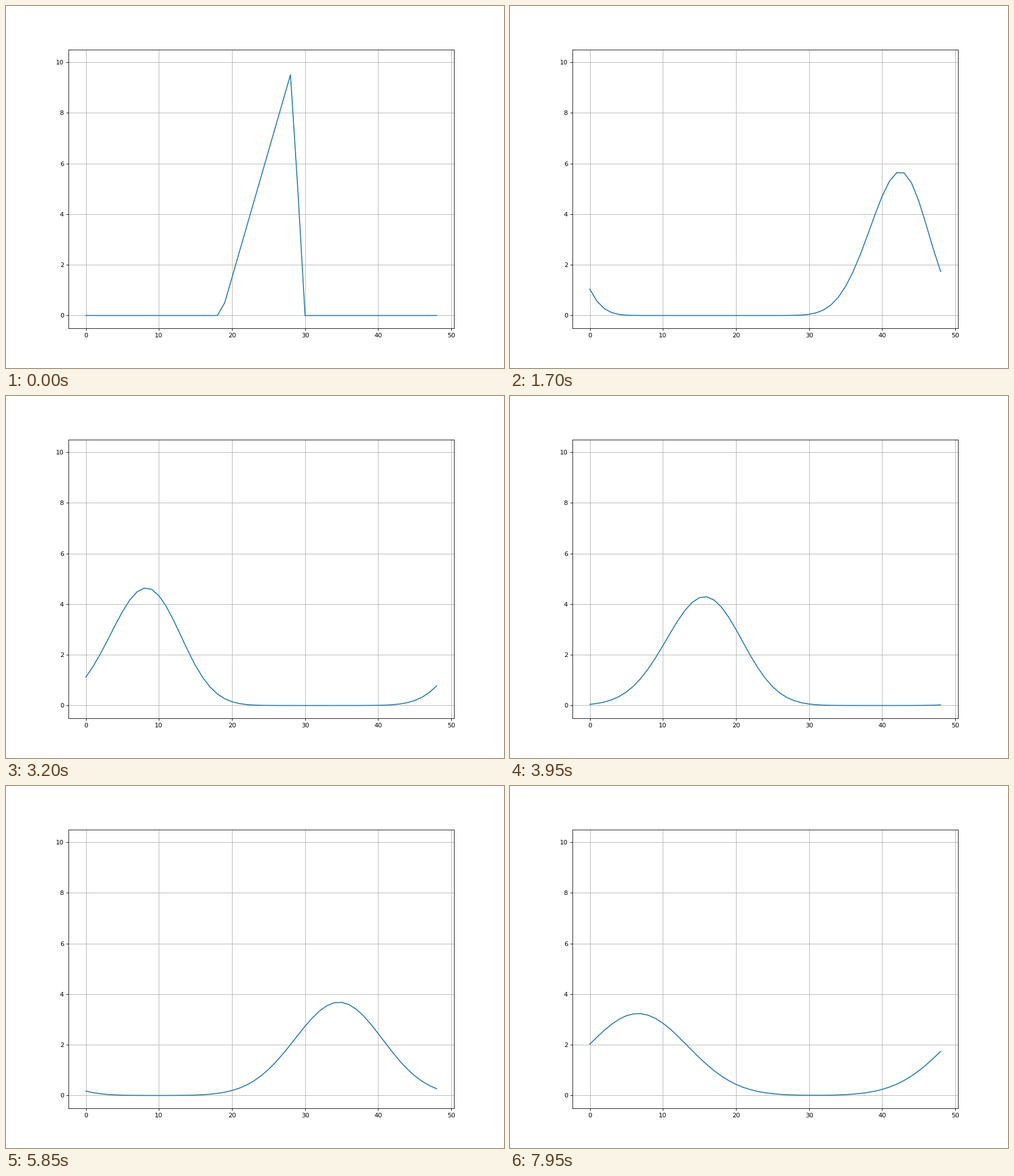
These frames come from a looping animation (877 px wide and 638 px high, 8 s). A matplotlib script:

```python
import numpy as np
import matplotlib.pyplot as plt
from matplotlib.animation import FuncAnimation

WIDTH, HEIGHT, DPI = 877, 638, 80
FRAMES, INTERVAL = 160, 50
CELLS = 49
COURANT = 0.5


def upwind(u):
    """One step of first-order upwind advection on a periodic grid."""
    return u - COURANT * (u - np.roll(u, 1))


# Sawtooth: a ramp from 0 to 10 followed by a sudden drop.
x = np.arange(CELLS)
states = [np.where((x >= 18) & (x <= 28), x - 18.0, 0.0)]
for _ in range(FRAMES - 1):
    states.append(upwind(states[-1]))

fig, ax = plt.subplots(figsize=(WIDTH / DPI, HEIGHT / DPI), dpi=DPI)
ax.set_xlim(-2.4, 50.4)
ax.set_ylim(-0.5, 10.5)
ax.grid(True)
line, = ax.plot(x, states[1])


def draw(frame):
    # The first step is held for two frames.
    line.set_ydata(states[max(frame, 1)])
    return line,


anim = FuncAnimation(fig, draw, frames=FRAMES, interval=INTERVAL,
                     repeat=True, repeat_delay=0, blit=False)
plt.show()
```
